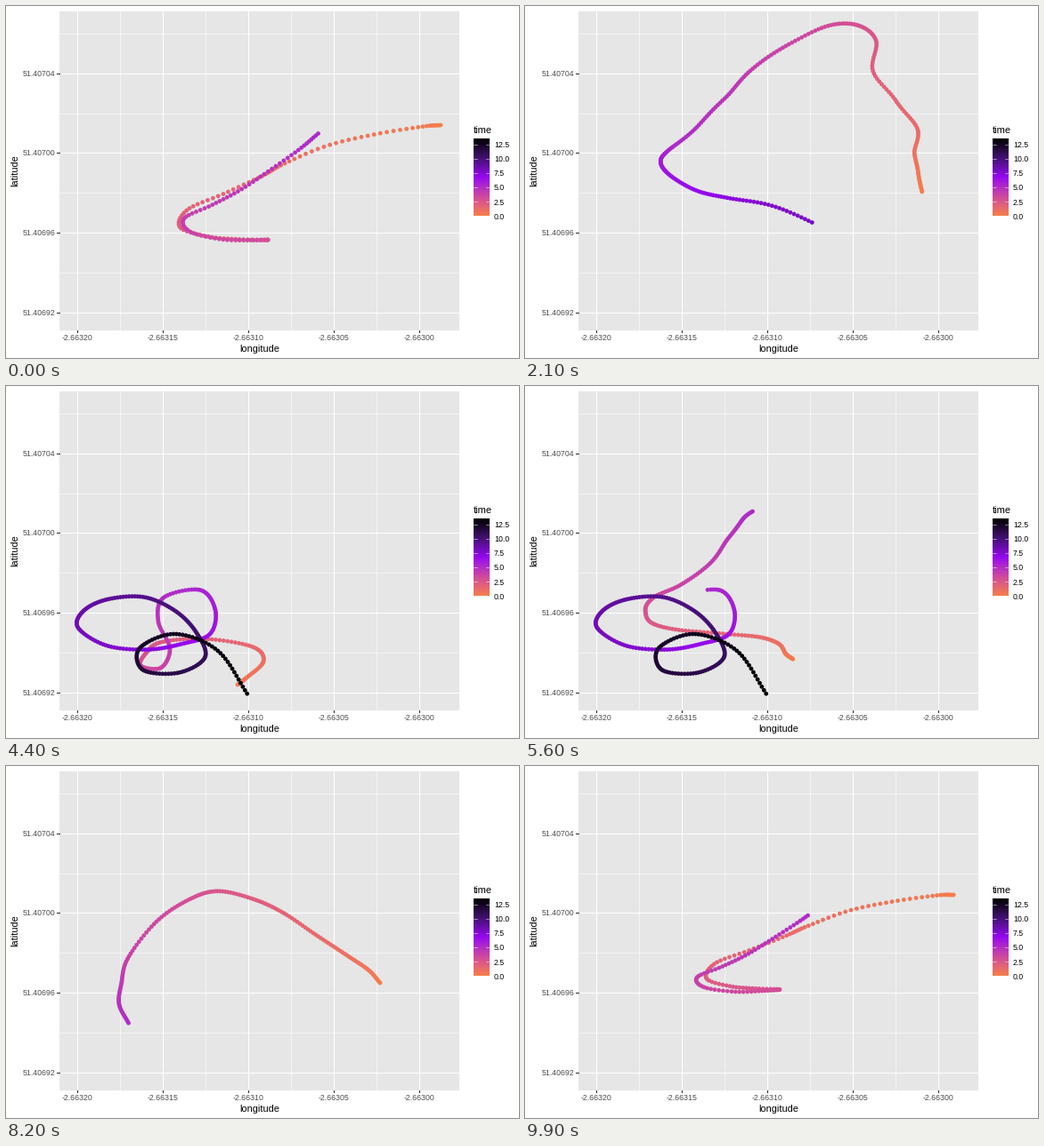
Animation of 576x396 px, one loop 10000 ms. Source, as a matplotlib script:

```python
import numpy as np
import matplotlib.pyplot as plt
from matplotlib.animation import FuncAnimation
from matplotlib.colors import LinearSegmentedColormap
from matplotlib.patches import Rectangle

W, H, DPI = 576, 396, 72
RATE = 30             # samples per second of flight
HOLD, MORPH = 10, 10  # frames
T_MAX = 13.45

plt.rcParams["font.family"] = "Liberation Sans"

SCALE = LinearSegmentedColormap.from_list("time", [
    (0, "#F67E4B"), (1 / 8, "#E36377"), (1 / 4, "#CE48A0"), (3 / 8, "#B02CC8"),
    (1 / 2, "#9608EE"), (3 / 4, "#421171"), (1, "black")], N=512)


def track(secs, *knots):
    """Samples of a smooth path through knots evenly spaced in time."""
    p = np.array(knots, float)
    m = np.gradient(p, axis=0)
    s = np.arange(0, secs + 1e-9, 1 / RATE) / secs * (len(p) - 1)
    i = np.minimum(s.astype(int), len(p) - 2)
    u = (s - i)[:, None]
    v = 1 - u
    return (v * v * ((1 + 2 * u) * p[i] + u * m[i])
            + u * u * ((1 + 2 * v) * p[i + 1] - v * m[i + 1]))


hook = track(
    5.2, (488, 134), (469, 135.5), (416, 144), (361, 157), (312, 177.5),
    (288, 191), (245, 211), (204, 229), (195.5, 249), (228, 259.5),
    (262, 262.5), (294, 263), (276, 263.5), (242, 262.5), (207, 254),
    (200, 239), (231, 224), (263, 207), (296, 185), (329, 161.5), (350.5, 143.5))

loops = track(
    T_MAX, (260, 336), (269, 329), (289, 310), (277, 293.5), (224, 284.5),
    (175, 288), (158, 299.5), (151, 314.5), (174, 317), (184, 295),
    (171, 265), (177, 238), (218, 229.5), (235, 252), (229, 279),
    (198, 290), (159, 296.5), (113, 292), (81, 272), (87, 253),
    (114, 240), (155, 237.5), (190, 253), (213.5, 277), (223.5, 305),
    (194, 322.5), (154, 319.5), (150, 295), (190, 279), (238, 298), (272, 348))

# The second flight, described by its pose 30% of the way into the loops.
drift = track(
    7.9, (390, 247), (389.5, 232), (392, 211), (394, 186), (367, 161),
    (334, 136), (326, 114), (309, 106), (284, 110), (260, 125),
    (237, 137), (215, 149), (194, 161.5), (181, 175.5), (176.5, 188),
    (178, 203), (184, 219), (195, 232.5), (209, 240), (229, 245), (252.5, 254.5))
arch = (drift - .3 * loops[:len(drift)]) / .7

bend = track(
    5.2, (328, 288), (311, 283.5), (287, 276.5), (254, 273), (205, 273),
    (155, 267.5), (124, 248.5), (122, 216), (142, 184), (176, 161),
    (221, 137), (260, 112.5), (286.5, 95.5), (291.5, 82))

bow = track(
    5.05, (420, 244), (407, 229.5), (382, 212.5), (348, 190), (311, 165),
    (277, 149.5), (238, 140.8), (206, 150), (169, 175), (137, 216),
    (129.5, 245), (127, 268), (138, 290))

FLIGHTS = [hook, arch, loops, bend, bow]
SHADES = SCALE(np.arange(len(loops)) / RATE / T_MAX)


def pose(frame):
    k, f = divmod(frame, HOLD + MORPH)
    a, b = FLIGHTS[k % 5], FLIGHTS[(k + 1) % 5]
    if f <= HOLD:
        return a
    u = (f - HOLD) / MORPH
    n = min(len(a), len(b))
    # Unmatched points wait in place until the morph is over.
    return np.vstack([a[:n] + u * (b[:n] - a[:n]), a[n:]])


# ---- chart ----
fig = plt.figure(figsize=(W / DPI, H / DPI), dpi=DPI, facecolor="white")
ax = fig.add_axes([0, 0, 1, 1])
ax.axis("off")

L, R, T, B = 60, 509, 5.5, 364.5
ax.add_patch(Rectangle((L, T), R - L, B - T, fc="#E6E6E6", ec="none", zorder=0))


def label(x, y, s, size=8.8, color="black", **kw):
    ax.text(x, y, s, fontsize=size, color=color, **kw)


xs = 80 + 96.1 * np.arange(5)
ys = 344.5 - 89.6 * np.arange(4)
minor = dict(color="white", lw=0.53, zorder=1)
major = dict(color="white", lw=1.07, zorder=2)
tick = dict(color="#333333", lw=1.07, zorder=2)

for x in xs[:-1] + 48.05:
    ax.plot([x, x], [T, B], **minor)
for y in ys - 44.8:
    ax.plot([L, R], [y, y], **minor)
for i, x in enumerate(xs):
    ax.plot([x, x], [T, B], **major)
    ax.plot([x, x], [B, B + 2.7], **tick)
    label(x, 376.2, f"{-2.6632 + 0.00005 * i:.5f}", color="#4D4D4D", ha="center")
for i, y in enumerate(ys):
    ax.plot([L, R], [y, y], **major)
    ax.plot([L - 2.7, L], [y, y], **tick)
    label(55.2, y + 3.2, f"{51.40692 + 0.00004 * i:.5f}", color="#4D4D4D", ha="right")

label(284.5, 389, "longitude", 11, ha="center")
label(10, 185, "latitude", 11, ha="center", va="center", rotation=90)

# ---- legend ----
X0, X1, Y0, Y1 = 525, 542.3, 150, 236.4
label(X0, 143, "time", 11)
ax.imshow(np.linspace(1, 0, 173)[:, None], cmap=SCALE,
          extent=[X0, X1, Y1, Y0], aspect="auto", zorder=2)
for v in np.arange(0, 13, 2.5):
    y = Y1 - v / T_MAX * (Y1 - Y0)
    for x in (X0, X1 - 3.5):
        ax.plot([x, x + 3.5], [y, y], color="white", lw=0.5, zorder=3)
    label(547.8, y + 3.2, f"{v:.1f}")

ax.set_xlim(0, W)
ax.set_ylim(H, 0)
dots = ax.scatter([], [], s=4.8 ** 2, linewidths=0, zorder=4)


def draw(frame):
    p = pose(frame)
    dots.set_offsets(p)
    dots.set_facecolor(SHADES[:len(p)])
    return dots,


anim = FuncAnimation(fig, draw, frames=5 * (HOLD + MORPH), interval=100,
                     repeat=True, repeat_delay=0, blit=False)
plt.show()
```
